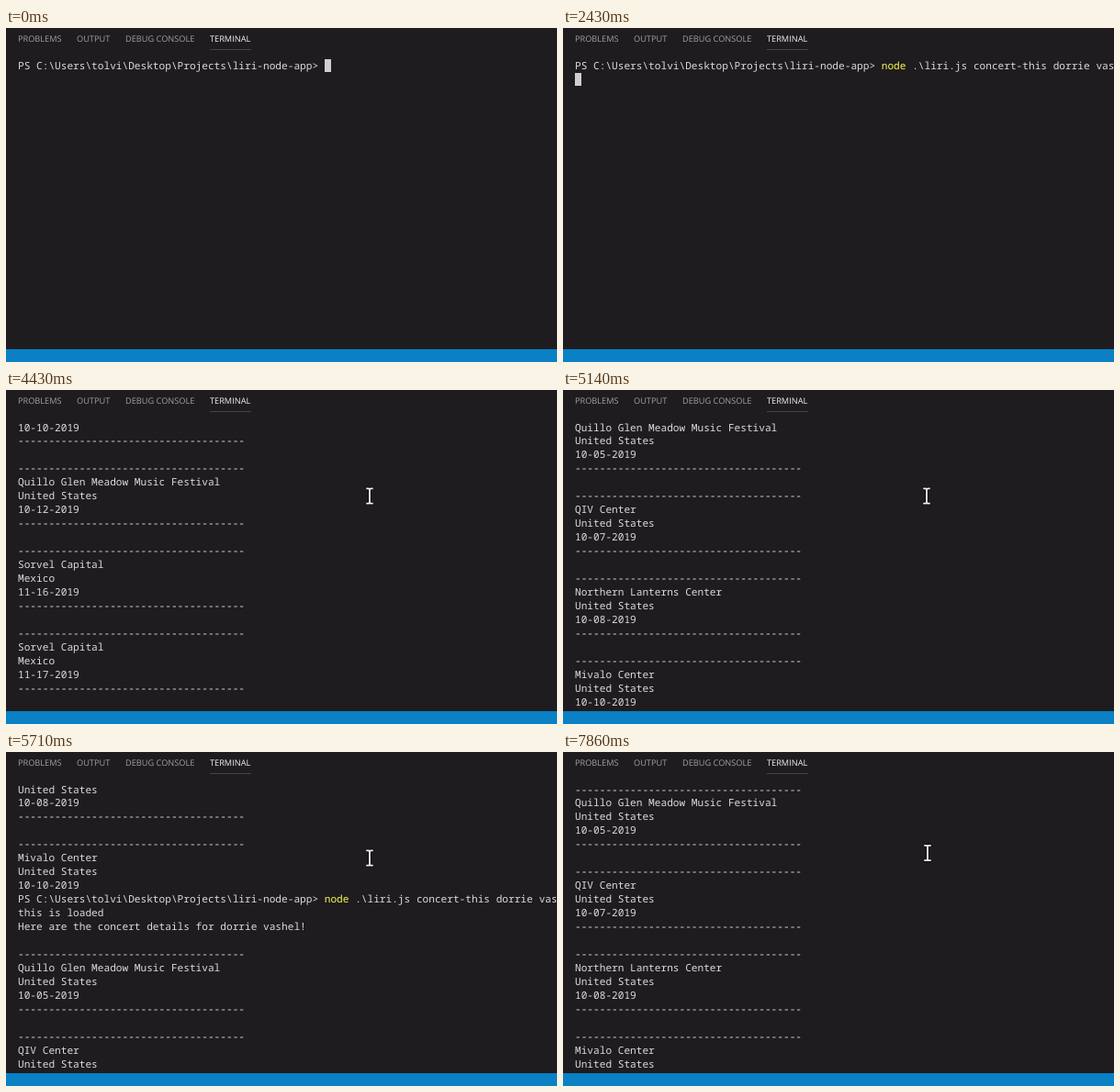
An HTML page for the animation above (8 s loop, 600x364 px).

```html
<!DOCTYPE html>
<html lang="en">
<head>
<meta charset="utf-8">
<title>Terminal session</title>
<style>
  html, body { margin: 0; width: 100%; height: 100%; overflow: hidden; background: #1e1c1f; }
  #stage { position: absolute; left: 0; top: 0; width: 600px; height: 364px; overflow: hidden; text-rendering: geometricPrecision; }
  .tab { position: absolute; top: 5px; font: 9.2px/14px "Open Sans", sans-serif; color: #a0a0a1; white-space: nowrap; }
  .tab.on { color: #f2f2f2; }
  #rule { position: absolute; left: 222px; top: 23px; width: 45px; height: 1px; background: #444345; }
  #screen { position: absolute; left: 0; top: 33px; width: 600px; height: 317px; overflow: hidden; }
  #text { position: absolute; left: 13px; top: 1.5px; margin: 0; font: 500 11.13px/14.95px "Noto Sans Mono", monospace; color: #dcdcdc; white-space: pre; }
  #text b { font-weight: inherit; color: #fafa50; }
  #block { position: absolute; width: 6.7px; height: 14.5px; background: #cfcfcf; }
  #bar { position: absolute; left: 0; top: 350px; width: 600px; height: 14px; background: #0a80c5; }
  #mouse { position: absolute; left: 0; top: 0; }
</style>
</head>
<body>
<div id="stage">
  <div class="tab" style="left:13px">PROBLEMS</div>
  <div class="tab" style="left:77px">OUTPUT</div>
  <div class="tab" style="left:130px">DEBUG CONSOLE</div>
  <div class="tab on" style="left:222px">TERMINAL</div>
  <div id="rule"></div>
  <div id="screen"><div id="block"></div><pre id="text"></pre></div>
  <div id="bar"></div>
  <svg id="mouse" width="16" height="24" viewBox="-8 -12 16 24" fill="none">
    <defs><path id="beam" d="M-3.7-8.2H-2Q0-8.2 0-7Q0-8.2 2-8.2H3.7M0-7V7M-3.7 8.2H-2Q0 8.2 0 7Q0 8.2 2 8.2H3.7"/></defs>
    <use href="#beam" stroke="#0c0b0c" stroke-width="3.4"/>
    <use href="#beam" stroke="#f4f4f4" stroke-width="1.8"/>
  </svg>
</div>
<script>
const LOOP = 8000, ROWS = 21, CHAR_W = 6.678, LINE_H = 14.95;
const PROMPT = "PS C:\\Users\\tolvi\\Desktop\\Projects\\liri-node-app> ";
const COMMAND = "node .\\liri.js concert-this dorrie vashel";
const RULE = "-".repeat(37);
const US = "United States", FEST = "Quillo Glen Meadow Music Festival";

const concerts = [
  [FEST, US, "10-05-2019"],
  ["QIV Center", US, "10-07-2019"],
  ["Northern Lanterns Center", US, "10-08-2019"],
  ["Mivalo Center", US, "10-10-2019"],
  [FEST, US, "10-12-2019"],
  ["Sorvel Capital", "Mexico", "11-16-2019"],
  ["Sorvel Capital", "Mexico", "11-17-2019"]
];

const output = [
  PROMPT + COMMAND,
  "this is loaded",
  "Here are the concert details for dorrie vashel!",
  "",
  ...concerts.flatMap(c => [RULE, ...c, RULE, ""])
];
const full = [...output, PROMPT];
// The scrollback repeats one screenful above the command.
const history = output.slice(5, 5 + ROWS);

// [time, first visible line]
const scrolls = [
  [3000, 26], [4430, 25], [4570, 20], [4710, 15], [4860, 9],
  [5140, 5], [5290, 1], [5430, -2], [5570, -5], [5710, -8],
  [5860, -10], [6000, -7], [6140, -4], [6290, 0], [6430, 1],
  [7710, 3], [7860, 4]
];

// [time, x, y]
const moves = [
  [3570, 519, 83], [3710, 462, 104], [3860, 408, 129],
  [4000, 386, 134], [4140, 396, 115.5], [7710, 396.5, 112], [7860, 397, 110]
];

const latest = (keys, t) => keys.filter(k => k[0] <= t).pop();
const $ = id => document.getElementById(id);

function session(t) {
  if (t < 2430) {
    const step = t < 860 ? 0 : Math.floor((t - 860) / 142.5 + 0.02) + 1;
    const typed = COMMAND.slice(0, Math.round(step * 4.6));
    return { lines: [PROMPT + typed], top: 0, row: 0, col: PROMPT.length + typed.length };
  }
  if (t < 2860) {
    const count = t < 2570 ? 1 : t < 2710 ? 2 : 3;
    return { lines: output.slice(0, count), top: 0, row: count, col: 0 };
  }
  if (t < 3000) return { lines: output.slice(0, 26), top: 5, row: 25, col: 10 };
  const done = t >= 3140;
  return {
    lines: done ? full : output,
    top: latest(scrolls, t)[1],
    row: output.length,
    col: done ? PROMPT.length : 0
  };
}

function markup(line) {
  return line.replace(/>/g, "&gt;").replace(/(&gt; )(n(?:o(?:de?)?)?)/, "$1<b>$2</b>");
}

let shown = "";
function draw() {
  const t = performance.now() % LOOP;
  const { lines, top, row, col } = session(t);

  const view = Array.from({ length: ROWS }, (_, i) => {
    const n = top + i;
    return (n < 0 ? history[ROWS + n] : lines[n]) || "";
  });
  const html = view.map(markup).join("\n");
  if (html !== shown) $("text").innerHTML = shown = html;

  const block = $("block").style;
  block.display = row - top < ROWS ? "block" : "none";
  block.left = 13 + col * CHAR_W + "px";
  block.top = 0.9 + (row - top) * LINE_H + "px";

  const spot = latest(moves, t);
  $("mouse").style.display = spot ? "block" : "none";
  if (spot) $("mouse").style.transform = `translate(${spot[1] - 8}px, ${spot[2] - 12}px)`;
  requestAnimationFrame(draw);
}
draw();
</script>
</body>
</html>
```
